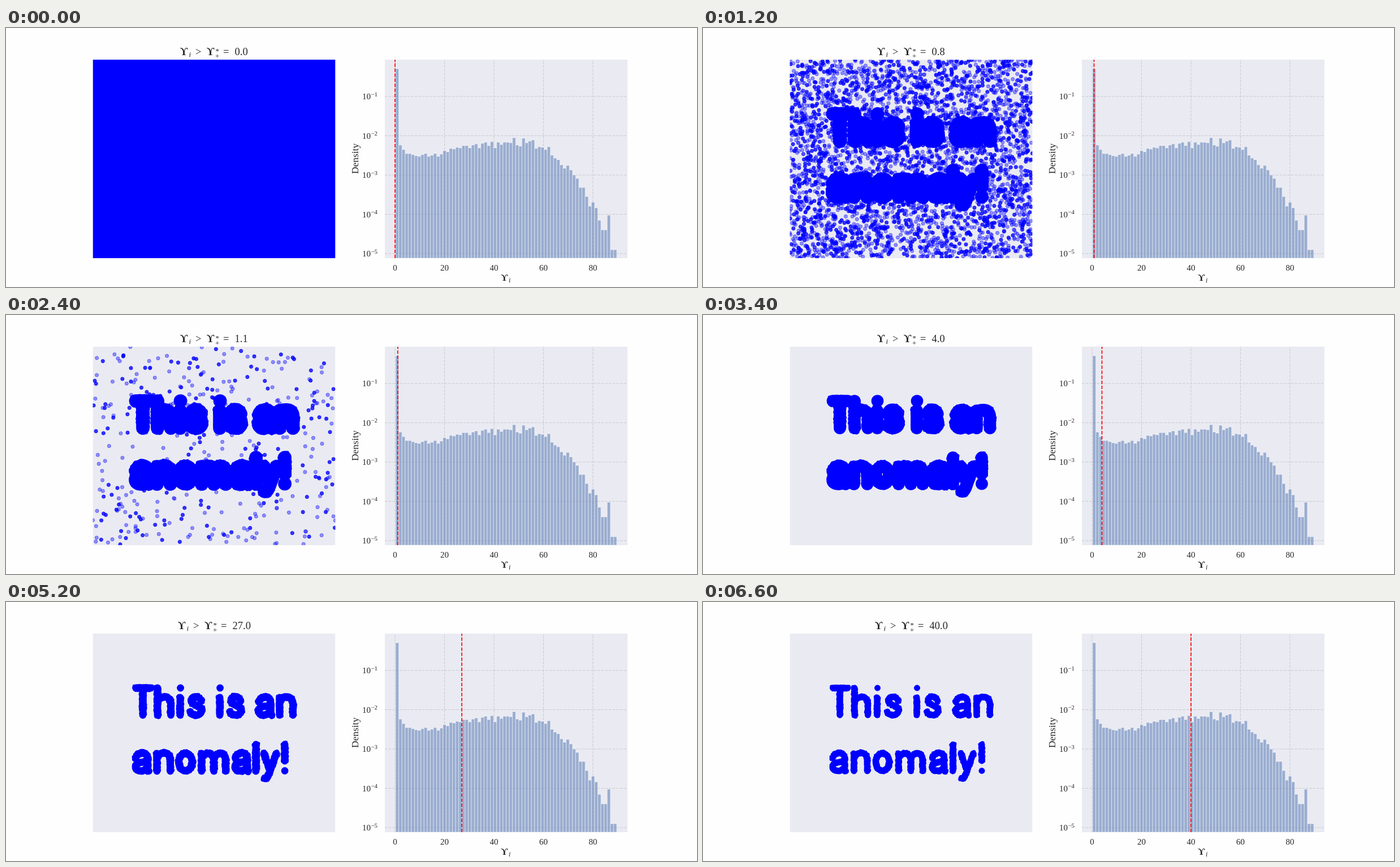
Write an HTML page with a canvas that moves like this. It is 1222x458 px and loops after 9 s.

```html
<!DOCTYPE html>
<html lang="en">
<head>
<meta charset="utf-8">
<title>Anomaly threshold</title>
<style>
html, body { margin: 0; width: 100%; height: 100%; overflow: hidden; background: #fefefe; }
canvas { display: block; width: 1222px; height: 458px; }
</style>
</head>
<body>
<canvas id="stage" width="1222" height="458"></canvas>
<script>
const ctx = document.getElementById('stage').getContext('2d');
const LOOP = 9000, STEP = 200;
const BLUE = '#0000ff', PANEL = '#eaeaf2', INK = '#262626';
const SERIF = '"Liberation Serif", "Noto Serif", serif';
const TOP = 56, H = 351;
const MAP = { x: 153.5, w: 429 };
const HIST = { x: 670, w: 429 };

// one threshold for each 200 ms step; the last one holds
const LEVELS = [0, .3, .4, .5, .6, .7, .8, .85, .9, .95, 1, 1.05, 1.1,
  1.5, 2, 2.5, 3, 4, 5, 10, 15, 20, 23, 24, 25, 26, 27, 28, 29, 30, 32, 34, 37, 40];

// top edge of each histogram bar
const BARS = [72, 207, 215, 222, 222, 224, 226, 227, 224, 222, 227, 225, 222, 227,
  223, 217, 219, 213, 214, 211, 212, 208, 208, 212, 207, 205, 212, 204, 202, 208,
  201, 212, 202, 206, 202, 202, 203, 194, 207, 209, 195, 203, 200, 198, 213, 210,
  211, 215, 210, 225, 230, 233, 242, 248, 243, 251, 260, 266, 282, 282, 298, 315,
  308, 318, 340, 357, 357, 331, 392, 392];

// centre lines of the letters
const GLYPH = {
  T: 'M229.5 152H256M242 152V200',
  h: 'M268 152V200M268 178C271 165 291 163 291.5 180V200',
  i: 'M308 169V200M308.5 152h.1',
  s: 'M345 175C342 165 328 165 328 174C328 184 346 182 346 191C346 203 328 202 326 194',
  a: 'M447 177C450 165 468 164 468 178V195Q468 199 470 200M468 182C464 185 447 183 446.5 192C446 202 464 203 468 192',
  n: 'M484 169V200M484 178C487 165 507 163 507.5 180V200',
  o: 'M305.5 283a12 15.5 0 1 1 24 0a12 15.5 0 1 1 -24 0',
  m: 'M346 268V299M346 277C349 265 367 263 367.5 279V299M367.5 277C371 265 388 263 388.5 279V299',
  l: 'M442 252V299',
  y: 'M456 268L467 298M478 268L465 304Q462 313 457 312',
  '!': 'M493 252V281M493 298.5h.1'
};
const WORDS = [['T'], ['h'], ['i'], ['s'], ['i', 70], ['s', 70], ['a'], ['n'],
  ['a', -217.5, 99], ['n', -217, 99], ['o'], ['m'], ['a', -41.5, 99], ['l'], ['y'], ['!']];

function seeded(a) {
  return () => {
    a = (a + 0x6d2b79f5) | 0;
    let t = Math.imul(a ^ (a >>> 15), 1 | a);
    t = (t + Math.imul(t ^ (t >>> 7), 61 | t)) ^ t;
    return ((t ^ (t >>> 14)) >>> 0) / 4294967296;
  };
}

const letters = new Path2D();
const rim = [];
const rnd = seeded(41);
for (const [name, dx = 0, dy = 0] of WORDS) {
  letters.addPath(new Path2D(GLYPH[name]), new DOMMatrix([1, 0, 0, 1, dx, dy]));
  const path = document.createElementNS('http://www.w3.org/2000/svg', 'path');
  path.setAttribute('d', GLYPH[name]);
  const len = path.getTotalLength();
  for (let d = 0; d <= len; d += 2) {
    const p = path.getPointAtLength(d);
    for (let k = 0; k < 4; k++) {
      rim.push({ x: p.x + dx, y: p.y + dy, a: rnd() * 2 * Math.PI, j: rnd() * 1.3 - 1 });
    }
  }
}

// background points, highest score first
const dots = Array.from({ length: 19000 }, () => ({
  x: MAP.x + rnd() * MAP.w, y: TOP + rnd() * H, alpha: rnd() < .6 ? .4 : .78
}));

function drawDots(v) {
  const n = Math.min(dots.length, Math.round(4000 * Math.exp(-(v - .8) * 7.7)));
  ctx.fillStyle = ctx.strokeStyle = BLUE;
  ctx.lineWidth = 1;
  for (let i = 0; i < n; i++) {
    const d = dots[i];
    ctx.globalAlpha = d.alpha;
    ctx.beginPath();
    ctx.arc(d.x, d.y, 3.1, 0, 2 * Math.PI);
    ctx.fill();
    ctx.stroke();
  }
  ctx.globalAlpha = 1;
}

function drawLetters(v) {
  const r = 5.5 + 7.7 * Math.exp(-v / 18.4);
  ctx.strokeStyle = ctx.fillStyle = BLUE;
  ctx.lineCap = ctx.lineJoin = 'round';
  ctx.lineWidth = 2 * r - 1.8;
  ctx.stroke(letters);
  ctx.lineCap = 'butt';
  ctx.beginPath();
  for (const p of rim) {
    const q = r - 3.2 + p.j;
    const x = p.x + Math.cos(p.a) * q, y = p.y + Math.sin(p.a) * q;
    ctx.moveTo(x + 3.3, y);
    ctx.arc(x, y, 3.3, 0, 2 * Math.PI);
  }
  ctx.fill();
}

function drawMap(v) {
  ctx.save();
  ctx.beginPath();
  ctx.rect(MAP.x, TOP, MAP.w, H);
  ctx.clip();
  ctx.fillStyle = v <= .5 ? BLUE : PANEL;
  ctx.fillRect(MAP.x, TOP, MAP.w, H);
  if (v > .5) {
    drawDots(v);
    drawLetters(v);
  }
  ctx.restore();
}

function text(str, x, y, size, style = '', align = 'left') {
  ctx.font = `${style} ${size}px ${SERIF}`;
  ctx.textAlign = align;
  ctx.fillStyle = INK;
  ctx.fillText(str, x, y);
}

function drawTitle(v) {
  const x = v < 10 ? 308 : 304;
  text('ϒ', x, 48, 18.5, 'bold');
  text('i', x + 15.5, 51, 13, 'italic');
  text('>', x + 27, 48, 18.5);
  text('ϒ', x + 47, 48, 18.5, 'bold');
  text('*', x + 62.5, 45, 13);
  text('+', x + 62, 54, 13);
  text('=', x + 76, 48, 18.5);
  text(v.toFixed(1), x + 96.5, 48, 18.5);
}

function line(x1, y1, x2, y2) {
  ctx.beginPath();
  ctx.moveTo(x1, y1);
  ctx.lineTo(x2, y2);
  ctx.stroke();
}

const xOf = v => 688 + 4.375 * v;

function drawHist(v) {
  const bottom = TOP + H, right = HIST.x + HIST.w;
  ctx.fillStyle = PANEL;
  ctx.fillRect(HIST.x, TOP, HIST.w, H);

  ctx.strokeStyle = '#c9c9cf';
  ctx.lineWidth = 1;
  ctx.setLineDash([4.6, 2]);
  for (let t = 0; t <= 80; t += 20) line(xOf(t), bottom, xOf(t), TOP);
  for (let e = 1; e <= 5; e++) {
    const y = 51.5 + 69.5 * e;
    line(HIST.x, y, right, y);
  }
  ctx.setLineDash([]);

  const w = 391 / BARS.length;
  ctx.fillStyle = 'rgba(76,114,176,.5)';
  ctx.strokeStyle = 'rgba(255,255,255,.5)';
  BARS.forEach((y, i) => {
    ctx.fillRect(689 + i * w, y, w, bottom - y);
    ctx.strokeRect(689 + i * w, y, w, bottom - y);
  });
  ctx.fillStyle = '#fefefe';
  ctx.fillRect(HIST.x, bottom, HIST.w, 2);

  ctx.strokeStyle = '#ff0000';
  ctx.lineWidth = 1.7;
  ctx.setLineDash([6.2, 2.7]);
  line(xOf(v), bottom, xOf(v), TOP);
  ctx.setLineDash([]);

  for (let t = 0; t <= 80; t += 20) text(t, xOf(t), 429, 15, '', 'center');
  for (let e = 1; e <= 5; e++) {
    const y = 56.5 + 69.5 * e;
    text('10', 630, y, 15);
    text('−' + e, 645.5, y - 5.5, 10.8);
  }
  text('ϒ', 875.5, 447, 16.5, 'bold');
  text('i', 889, 449.5, 12, 'italic');
  ctx.save();
  ctx.translate(623, 231);
  ctx.rotate(-Math.PI / 2);
  text('Density', 0, 0, 17.3, '', 'center');
  ctx.restore();
}

let shown = -1;
function frame(now) {
  const step = Math.min(LEVELS.length - 1, Math.floor((now % LOOP) / STEP));
  if (step !== shown) {
    shown = step;
    const v = LEVELS[step];
    ctx.fillStyle = '#fefefe';
    ctx.fillRect(0, 0, 1222, 458);
    drawMap(v);
    drawTitle(v);
    drawHist(v);
  }
  requestAnimationFrame(frame);
}
frame(performance.now());
</script>
</body>
</html>
```
